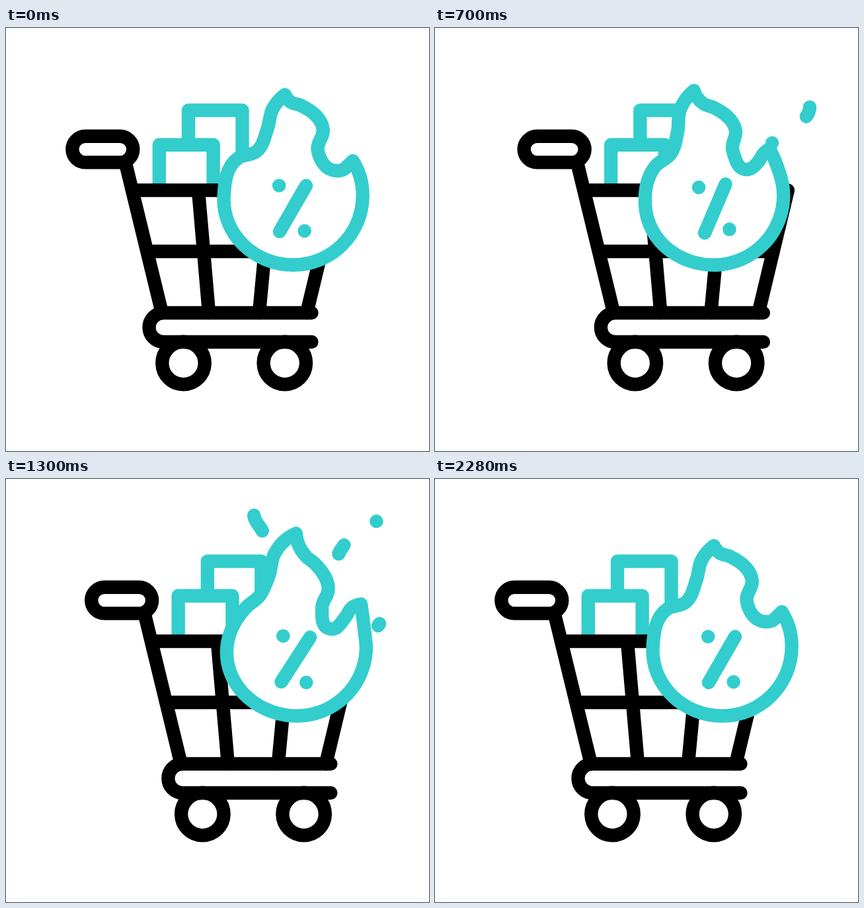
An HTML page for the animation above (2.4 s loop, 640x640 px).

```html
<!DOCTYPE html>
<html lang="en">
<head>
<meta charset="utf-8">
<title>Hot deals cart</title>
<style>
  html, body { margin: 0; width: 100%; height: 100%; overflow: hidden; background: #fff; }
  svg { display: block; width: 100%; height: 100%; fill: none; stroke-width: 20.4; stroke-linecap: round; stroke-linejoin: round; }
  .hot { stroke: #33cdcd; }
  .ink { stroke: #000; }
  .solid { fill: #fff; }
  .dot { fill: #33cdcd; stroke: none; }
</style>
</head>
<body>
<svg viewBox="0 0 640 640">
  <g id="cart">
    <g class="hot">
      <path d="M276 245V124.5H357.5V245"/>
      <path class="solid" d="M231.8 245V176.7H313.6V245"/>
    </g>
    <g class="ink">
      <rect x="100.3" y="163.8" width="92" height="39.6" rx="19.8"/>
      <path d="M181.5 207L236 431M193 245.5H499.5L455 431M215 338H475M291 245.5L307 431M400.5 245.5L383 431"/>
      <path d="M462.5 431H238.5A22 22 0 0 0 238.5 475H462.5"/>
      <circle cx="268.5" cy="507" r="32.2"/>
      <circle cx="421.8" cy="507" r="32.2"/>
    </g>
  </g>
  <g id="flame" class="hot">
    <path id="outline" class="solid"/>
    <path d="M19.3 -15L-20.7 54.5"/>
    <circle class="dot" cx="-21.5" cy="-15" r="10.3"/>
    <circle class="dot" cx="17" cy="53.5" r="10.3"/>
  </g>
  <g id="embers" class="hot"></g>
</svg>
<script>
const LOOP = 2400, CX = 434.7, CY = 253.5, R = 105;
const $ = id => document.getElementById(id);

// [time, value] steps
const CART = [[0, 0], [455, 59.5], [1004, 0], [1040, 0], [1573, 59.5], [2040, 0]];
const ROLL = [[0, 0], [545, -11.2], [1040, 7.4], [1600, -2.6], [2060, 0]];
const FLARE = [[0, 0], [430, 1], [930, 0], [1380, 1], [1800, 0]];

// Key points around the body centre, clockwise: x, y and their shift when flaring up
const TONGUE = [
  [-12.7, -152.5, 3, -20], [-4, -141.5, 12, 5], [11, -136.5, 10, 10],
  [45, -100.5, -2, 14], [37, -68.5, -2, 7], [65, -37.5, -14, 9],
  [74, -38.5, -4, -9], [84, -46.5, -3, -19], [90, -52.5, 4, -18]
];
const BODY = [-15.5, 0, 90, 180].map(deg => {
  const a = deg * Math.PI / 180;
  return [R * Math.cos(a), R * Math.sin(a), 0, 0];
});
const NECK = [[-83, -57, 1, 5], [-56, -66.5, -4, -9], [-39, -101.5, -9, -5], [-31, -131.5, -11, -7]];
const FLAME = [...TONGUE, ...BODY, ...NECK];
const CORNERS = [0, TONGUE.length - 1];

// Embers share one wavy climb: start place and time of birth
const RISE = 74, WAVE = 72, SWAY = 8, LIFE = 810;
const EMBERS = [[559, 138, 500], [510, 174, 690], [383, 107, 905], [563, 222, 1225]].map(([x, y, born]) => {
  const el = document.createElementNS("http://www.w3.org/2000/svg", "path");
  $("embers").append(el);
  return { x, y, born, el };
});

const smooth = u => u * u * (3 - 2 * u);
const ramp = (t, a, b) => smooth(Math.min(1, Math.max(0, (t - a) / (b - a))));
const dot = (a, b) => a[0] * b[0] + a[1] * b[1];
const sub = (a, b) => [a[0] - b[0], a[1] - b[1]];
const unit = v => { const d = Math.hypot(...v) || 1; return [v[0] / d, v[1] / d]; };
const mirror = (v, u) => { const k = 2 * dot(v, u); return [k * u[0] - v[0], k * u[1] - v[1]]; };

function at(steps, t) {
  const i = steps.findIndex(s => s[0] > t);
  if (i < 0) return steps[steps.length - 1][1];
  const [t0, a] = steps[i - 1], [t1, b] = steps[i];
  return a + (b - a) * ramp(t, t0, t1);
}

// Direction at q of the circle through p, q and r
function tangent(p, q, r) {
  const a = sub(q, p), b = sub(r, q), m = dot(a, a), n = dot(b, b);
  return unit([a[0] / m + b[0] / n, a[1] / m + b[1] / n]);
}

// Closed path through the points, with arc-like segments
function curve(pts) {
  const n = pts.length;
  const dirs = pts.map((p, i) => CORNERS.includes(i) ? null
    : tangent(pts[(i + n - 1) % n], p, pts[(i + 1) % n]));
  let d = "M" + pts[0];
  pts.forEach((p, i) => {
    const j = (i + 1) % n, q = pts[j], c = sub(q, p), u = unit(c);
    const a = dirs[i] || mirror(dirs[j], u), b = dirs[j] || mirror(dirs[i], u);
    const reach = v => Math.hypot(...c) * 2 / 3 / (1 + Math.max(0, dot(v, u)));
    const h = reach(a), k = reach(b);
    d += "C" + [p[0] + a[0] * h, p[1] + a[1] * h, q[0] - b[0] * k, q[1] - b[1] * k, ...q].map(x => x.toFixed(2));
  });
  return d + "Z";
}

function drawEmber({ x, y, born, el }, t) {
  const age = t - born;
  el.style.display = age >= 0 && age < LIFE ? "" : "none";
  const head = RISE * ramp(age, 0, 620), tail = RISE * ramp(age, 100, 800);
  const pts = [];
  for (let i = 0; i <= 12; i++) {
    const up = tail + (head - tail + 0.01) * i / 12;
    pts.push([x + SWAY * Math.sin(2 * Math.PI * up / WAVE), y - up]);
  }
  el.setAttribute("d", "M" + pts.join("L"));
}

function draw(t) {
  $("cart").setAttribute("transform", `translate(${at(CART, t)} 0)`);

  // The flame rolls on its round base
  const deg = at(ROLL, t), x = CX + R * deg * Math.PI / 180, k = at(FLARE, t);
  $("flame").setAttribute("transform", `translate(${x} ${CY}) rotate(${deg})`);
  $("outline").setAttribute("d", curve(FLAME.map(([px, py, dx, dy]) => [px + dx * k, py + dy * k])));

  EMBERS.forEach(e => drawEmber(e, t));
}

const start = performance.now();
function tick() {
  draw((performance.now() - start) % LOOP);
  requestAnimationFrame(tick);
}
tick();
</script>
</body>
</html>
```
